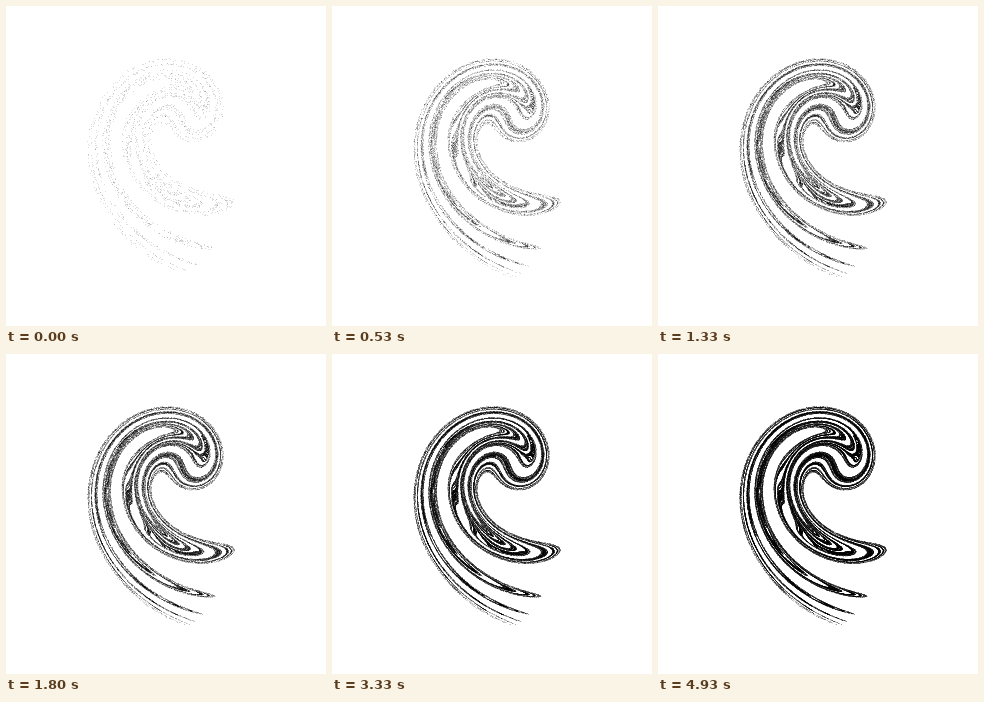
Write an HTML page with a canvas that moves like this. It is 320 px wide and 320 px high and loops after 4.99 s.

```html
<!DOCTYPE html>
<html>
<head>
<meta charset="utf-8">
<style>
html, body { margin: 0; width: 100%; height: 100%; overflow: hidden; background: #fff; }
canvas { display: block; }
</style>
</head>
<body>
<canvas id="stage" width="320" height="320"></canvas>
<script>
const ctx = document.getElementById('stage').getContext('2d');
const LOOP = 4990, STEPS = 75, PER_STEP = 2200, U = 0.9;
const INK = 'rgba(0, 0, 0, 0.13)';
const STEP_MS = 200 / 3;

// Ikeda map: one long orbit, with the first iterations dropped
const xs = [], ys = [];
let x = 0.1, y = 0.1;
for (let i = -100; i < STEPS * PER_STEP; i++) {
  const a = 0.4 - 6 / (1 + x * x + y * y);
  const c = Math.cos(a), s = Math.sin(a);
  [x, y] = [1 + U * (x * c - y * s), U * (x * s + y * c)];
  if (i >= 0) { xs.push(x); ys.push(-y); }
}

// Maps the range of the values onto the pixels from lo to hi
function fit(values, lo, hi) {
  const min = values.reduce((a, b) => Math.min(a, b));
  const max = values.reduce((a, b) => Math.max(a, b));
  return values.map(v => Math.floor(lo + (v - min) * (hi - lo) / (max - min)));
}
const px = fit(xs, 81.5, 228.5);
const py = fit(ys, 52.5, 270.6);

// Every hit darkens its pixel a little, so dense bands turn black first
let drawn = 0;
function draw(time) {
  const t = Math.floor((time % LOOP) / 10) * 10;
  const step = Math.min(STEPS - 1, Math.floor((t + 4.9) / STEP_MS));
  const count = (step + 1) * PER_STEP;
  if (count < drawn) drawn = 0;
  if (!drawn) {
    ctx.fillStyle = '#fff';
    ctx.fillRect(0, 0, 320, 320);
  }
  ctx.fillStyle = INK;
  for (; drawn < count; drawn++) ctx.fillRect(px[drawn], py[drawn], 1, 1);
}

const start = performance.now();
function tick() {
  draw(performance.now() - start);
  requestAnimationFrame(tick);
}
tick();
</script>
</body>
</html>
```
